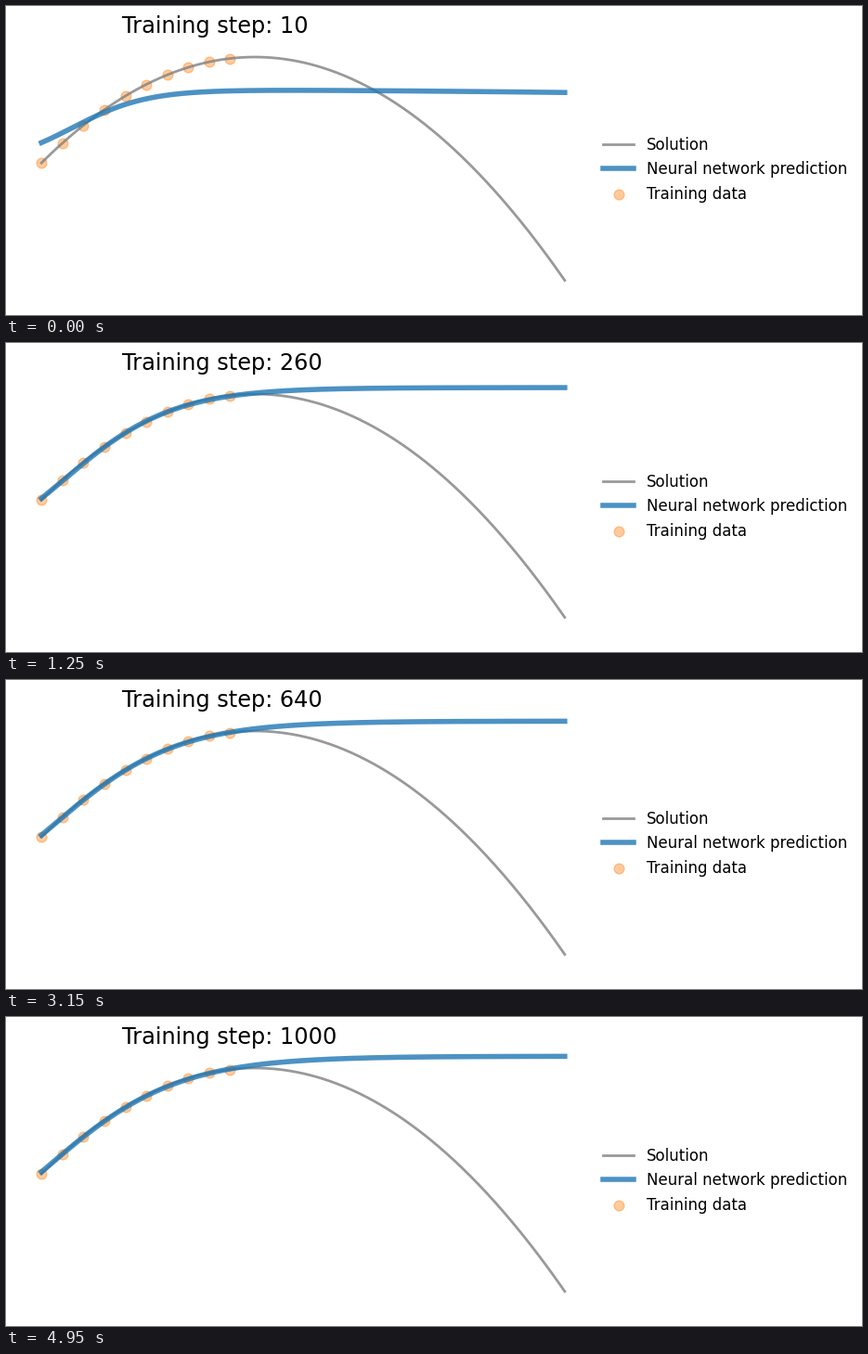
A matplotlib script for the animation above (5000 ms loop, 922 by 333 pixels).

```python
import numpy as np
import matplotlib.pyplot as plt
from matplotlib.animation import FuncAnimation

W, H, DPI = 922, 333, 100
FRAMES, INTERVAL = 100, 50
LEFT, BOTTOM, AX_W, AX_H = 10, 10, 620, 308
X0, SPAN = LEFT + AX_W * 0.05 / 1.1, AX_W / 1.1


def to_px(x):
    return X0 + SPAN * x


def solution(x):
    """Parabolic flight path, as stage height."""
    return 55 + 0.00216 * (to_px(x) - 268) ** 2


def saturating(x, level, height, center, width):
    """Rise that flattens out at a level, like a tanh unit."""
    return level + height * (1 - np.tanh((to_px(x) - center) / width))


def mix(a, b, t):
    return a + t * (b - a)


def prediction(x, step):
    """Fast, overshooting fit, then a slow widening of the curve."""
    s = step - 10
    fit = 1 - np.exp(-0.052 * s) * np.cos(np.pi * s / 20)
    drift = (1 - np.exp(-1.2 * (step - 190) / 810)) / (1 - np.exp(-1.2))
    early = saturating(x, 89.9, 41, 72, 80) + 3.3 * x ** 2
    late = saturating(x, level=mix(49, 42.3, drift), height=mix(97, 120.5, drift),
                      center=mix(64, 43, drift), width=mix(115, 141, drift))
    return mix(early, late, fit)


x = np.linspace(0, 1, 500)
x_data = x[0:200:20]

fig = plt.figure(figsize=(W / DPI, H / DPI), dpi=DPI, facecolor="white")
ax = fig.add_axes([LEFT / W, BOTTOM / H, AX_W / W, AX_H / H])
ax.set_xlim(-0.05, 1.05)
ax.set_ylim(H - BOTTOM, H - BOTTOM - AX_H)
ax.axis("off")

ax.plot(x, solution(x), color="grey", linewidth=2, alpha=0.8, label="Solution")
fit_line, = ax.plot(x, prediction(x, 10), color="tab:blue", linewidth=4, alpha=0.8,
                    label="Neural network prediction")
ax.scatter(x_data, solution(x_data), s=60, color="tab:orange", alpha=0.4,
           label="Training data")
ax.legend(loc=(1.01, 0.34), frameon=False, fontsize="large", labelcolor="black")
title = ax.text((125 - X0) / SPAN, 29, "", fontsize="xx-large", color="black")


def update(frame):
    step = 10 * (frame + 1)
    fit_line.set_ydata(prediction(x, step))
    title.set_text(f"Training step: {step}")
    return fit_line, title


anim = FuncAnimation(fig, update, frames=FRAMES, interval=INTERVAL,
                     repeat=True, repeat_delay=0)
plt.show()
```
